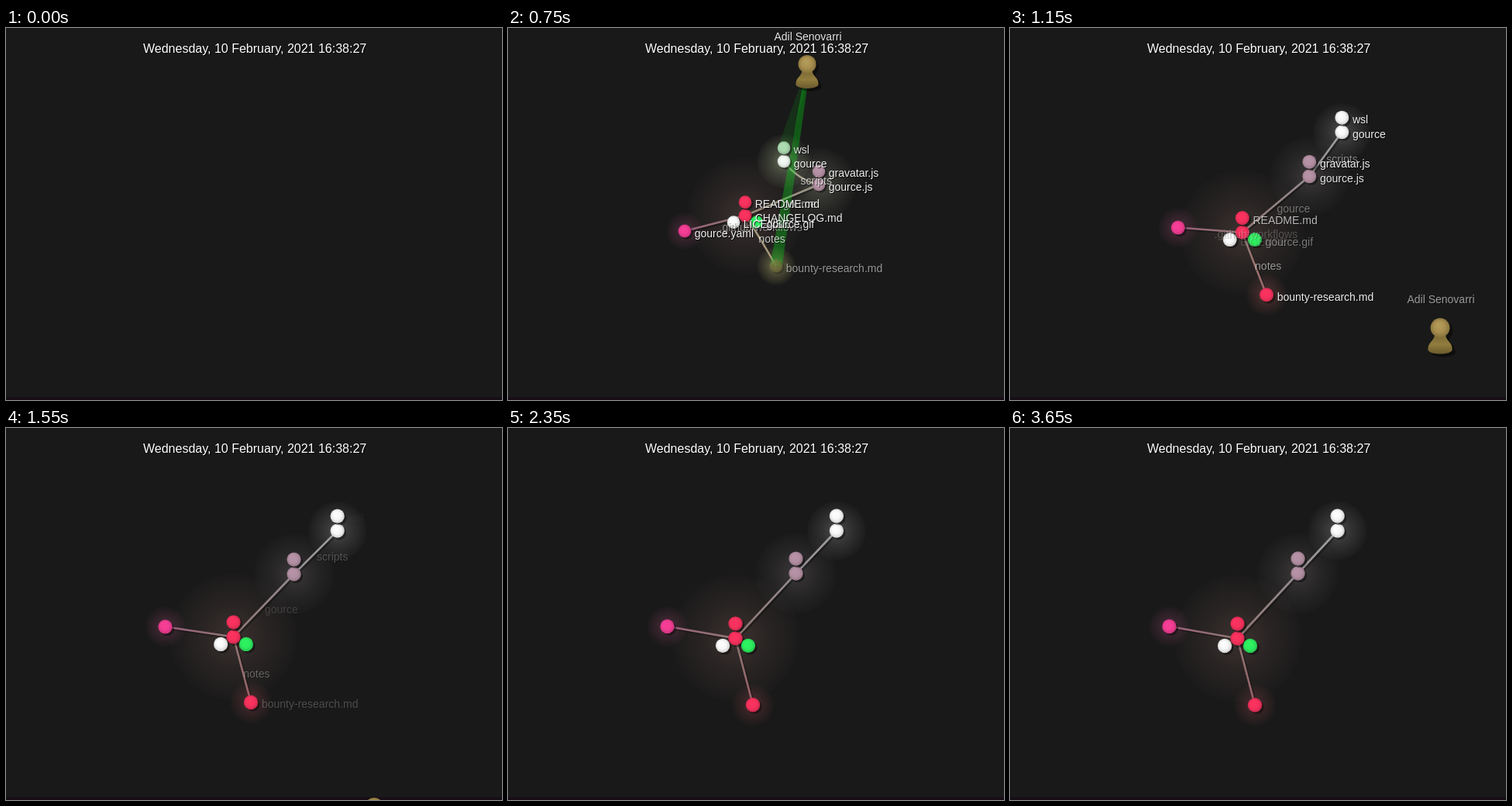
An HTML page with a canvas that plays this animation: 640x480 px, repeating every 3.7 s.

```html
<!DOCTYPE html>
<html lang="en">
<head>
<meta charset="utf-8">
<title>Repository history</title>
<style>
  html, body { margin: 0; width: 100%; height: 100%; overflow: hidden; background: #191919; }
  canvas { display: block; width: 640px; height: 480px; }
</style>
</head>
<body>
<canvas id="stage" width="640" height="480"></canvas>
<script>
const ctx = document.getElementById('stage').getContext('2d');
const LOOP = 3700, STEP = 50, TURN = 750, USER_GONE = 1700;
const FONT = '"Liberation Sans", Arial, sans-serif';
const BLACK = [0, 0, 0], WHITE = [252, 252, 252], GREY = [108, 108, 108];
const RED = [252, 50, 95], PINK = [246, 62, 150], LIME = [45, 242, 96], MAUVE = [182, 146, 166];
const NEW_FILE = [25, 210, 45], NEW_GLOW = [140, 165, 95], NEW_EDGE = [170, 165, 125];

const clamp = (v, a = 0, b = 1) => Math.min(b, Math.max(a, v));
const smooth = v => (v = clamp(v), v * v * (3 - 2 * v));
const lerp = (a, b, k) => a + (b - a) * k;
const mix = (a, b, k) => a.map((v, i) => lerp(v, b[i], k));
const rgba = (c, a = 1) => `rgba(${c.map(Math.round).join()},${a})`;
const point = ([x, y]) => ({ x, y });

// A folder grows from its birth place to a turning point, then settles at rest.
const dirs = {
  root: { born: 90, from: [340, 235], turn: [306, 242], rest: [293.5, 271.5],
          radius: 82, glow: [170, 128, 120], power: 0.24 },
  flows: { born: 90, parent: 'root', label: '.github/workflows', shift: 4,
           from: [312, 262], turn: [228, 262], rest: [205.5, 256],
           radius: 26, glow: [190, 85, 135], power: 0.34 },
  gource: { born: 370, parent: 'root', label: 'gource',
            from: [379, 228], turn: [401, 202], rest: [371.5, 187.5],
            radius: 52, glow: [180, 166, 174], power: 0.22 },
  scripts: { born: 500, parent: 'gource', label: 'scripts', bend: [-5, 9], sway: 7,
             from: [377, 208], turn: [356, 172], rest: [422.5, 132.5],
             radius: 38, glow: [205, 205, 205], power: 0.28 },
  notes: { born: 620, parent: 'root', label: 'notes', bend: [-8, -16],
           from: [322, 262], turn: [346, 307], rest: [316, 357.5],
           radius: 27, glow: [190, 85, 95], power: 0.34 }
};

// Files appear one after another in this order.
const files = [
  ['flows', 'gource.yaml', PINK],
  ['root', 'CHANGELOG.md', RED],
  ['root', 'LICENSE', WHITE],
  ['root', 'gource.gif', LIME],
  ['root', 'README.md', RED],
  ['gource', 'gource.js', MAUVE],
  ['gource', 'gravatar.js', MAUVE],
  ['scripts', 'gource', WHITE],
  ['scripts', 'wsl', WHITE],
  ['notes', 'bounty-research.md', RED]
].map(([dir, name, color], i) => ({ dir: dirs[dir], name, color, born: 90 + 60 * i }));

for (const d of Object.values(dirs)) {
  d.parent = dirs[d.parent];
  // The first file sits in the centre, the others spread evenly on a ring.
  const own = files.filter(f => f.dir === d);
  own.forEach((f, i) => {
    const angle = Math.PI / 2 * 3 - 2 * Math.PI * i / Math.max(1, own.length - 1);
    f.offset = i ? [Math.cos(angle) * 19, Math.sin(angle) * 19] : [0, 0];
  });
}

const userPath = [[100, 350, 222], [400, 391.5, 171], [750, 386, 57], [1050, 573, 300],
                  [1150, 555, 398], [1550, 475, 501], [1700, 450, 525]];

// Cubic curve through timed key points.
function along(keys, t) {
  const n = keys.length - 1;
  t = clamp(t, keys[0][0], keys[n][0]);
  let i = 0;
  while (i < n - 1 && t > keys[i + 1][0]) i++;
  const a = keys[i], b = keys[i + 1], span = b[0] - a[0], s = (t - a[0]) / span;
  const slope = (j, k) => {
    const p = keys[Math.max(0, j - 1)], q = keys[Math.min(n, j + 1)];
    return (q[k] - p[k]) / (q[0] - p[0]) * span;
  };
  const axis = k => lerp(a[k], b[k], smooth(s))
    + s * (1 - s) * ((1 - s) * slope(i, k) - s * slope(i + 1, k));
  return point([axis(1), axis(2)]);
}

function dirPos(d, t) {
  if (t <= TURN) return point(mix(d.from, d.turn, smooth((t - d.born) / (TURN - d.born))));
  const age = t - TURN, swing = age / 400 * Math.exp(1 - age / 400);
  return {
    x: lerp(d.turn[0], d.rest[0], d.sway ? 1 - Math.exp(-age / 100) : smooth(age / 800))
      + (d.sway || 0) * swing,
    y: lerp(d.turn[1], d.rest[1], 1 - Math.exp(-age / (d.sway ? 130 : 300)))
  };
}

const zoomAt = t => Math.max(0.45, 1 - 0.32 * Math.exp((400 - t) / 275));
const freshness = (d, t) => clamp(1 - (t - d.born) / 600);
const dirAlpha = age => 0.85 * clamp(age / 40) * clamp(1 - age / 1450);
const fileAlpha = age => 0.93 * clamp(age / 200, 0.25) * smooth((1020 - age) / 300);
const userAlpha = t => 0.9 * clamp((1500 - t) / 550);

function text(str, x, y, alpha, size = 14, align = 'left') {
  if (alpha <= 0.01) return;
  ctx.font = `${size}px ${FONT}`;
  ctx.textAlign = align;
  ctx.fillStyle = rgba(BLACK, alpha * 0.8);
  ctx.fillText(str, x + 1, y + 1);
  ctx.fillStyle = `rgba(255,255,255,${alpha})`;
  ctx.fillText(str, x, y);
}

function disc(x, y, r, fill) {
  ctx.fillStyle = fill;
  ctx.beginPath();
  ctx.arc(x, y, r, 0, Math.PI * 2);
  ctx.fill();
}

function shade(gradient, ...colors) {
  colors.forEach((c, i) => gradient.addColorStop(i / (colors.length - 1), c));
  return gradient;
}

function drawGlow(d, t, zoom) {
  const { x, y } = d.pos, r = d.radius * zoom, fresh = freshness(d, t);
  const color = mix(d.glow, NEW_GLOW, fresh);
  const power = d.power * (1 + 1.5 * fresh) * clamp((t - d.born) / 100);
  disc(x, y, r, shade(ctx.createRadialGradient(x, y, 0, x, y, r),
    rgba(color, power), rgba(color, power * 0.47), rgba(color, power * 0.06)));
}

function placeEdge(d, t) {
  const p = d.parent.pos, q = d.pos, [bx, by] = d.bend || [0, 0];
  const k = clamp((1250 - t) / 500);
  d.ctrl = { x: (p.x + q.x) / 2 + bx * k, y: (p.y + q.y) / 2 + by * k };
  d.mid = { x: (p.x + q.x) / 4 + d.ctrl.x / 2, y: (p.y + q.y) / 4 + d.ctrl.y / 2 };
}

function drawEdge(d, t, zoom) {
  const p = d.parent.pos, q = d.pos, fresh = freshness(d, t);
  const tone = n => rgba(mix(mix(n.glow, GREY, 0.45), NEW_EDGE, fresh));
  const stroke = (off, style) => {
    ctx.strokeStyle = style;
    ctx.beginPath();
    ctx.moveTo(p.x + off, p.y + off);
    ctx.quadraticCurveTo(d.ctrl.x + off, d.ctrl.y + off, q.x + off, q.y + off);
    ctx.stroke();
  };
  ctx.globalAlpha = clamp((t - d.born) / 80);
  ctx.lineWidth = 1.2 + 1.4 * zoom;
  stroke(2, rgba(BLACK, 0.3));
  stroke(0, shade(ctx.createLinearGradient(p.x, p.y, q.x, q.y), tone(d.parent), tone(d)));
  ctx.globalAlpha = 1;
}

function drawBeam(f, t, from, zoom) {
  const power = Math.pow(clamp(1 - (t - f.born) / 240), 1.5);
  if (!power) return;
  const dx = f.pos.x - from.x, dy = f.pos.y - from.y, len = Math.hypot(dx, dy) || 1;
  const nx = -dy / len * zoom, ny = dx / len * zoom;
  ctx.fillStyle = `rgba(8,205,25,${power})`;
  ctx.beginPath();
  ctx.moveTo(from.x + nx * 3, from.y + ny * 3);
  ctx.lineTo(f.pos.x + nx * 8.5, f.pos.y + ny * 8.5);
  ctx.lineTo(f.pos.x - nx * 8.5, f.pos.y - ny * 8.5);
  ctx.lineTo(from.x - nx * 3, from.y - ny * 3);
  ctx.fill();
}

function drawBall(f, t, zoom) {
  const { x, y } = f.pos, r = 9.2 * zoom, age = t - f.born;
  const color = mix(f.color, NEW_FILE, clamp(1 - age / 250));
  const dark = k => rgba(mix(color, BLACK, k));
  ctx.globalAlpha = clamp(age / 200);
  disc(x + 2.5 * zoom, y + 2.5 * zoom, r, rgba(BLACK, 0.4));
  disc(x, y, r, shade(ctx.createRadialGradient(x - r * 0.2, y - r * 0.25, r * 0.3, x, y, r),
    dark(0), dark(0.03), dark(0.18)));
  ctx.globalAlpha = 1;
}

function pawn(body, head) {
  ctx.fillStyle = body;
  ctx.beginPath();
  ctx.moveTo(-7, -3);
  ctx.bezierCurveTo(-8, 7, -16, 7, -16, 17);
  ctx.bezierCurveTo(-16, 25, 16, 25, 16, 17);
  ctx.bezierCurveTo(16, 7, 8, 7, 7, -3);
  ctx.fill();
  disc(0, -11.5, 12.7, head);
}

function drawUser(pos, zoom) {
  ctx.save();
  ctx.translate(pos.x + 4 * zoom, pos.y + 4 * zoom);
  ctx.scale(zoom, zoom);
  pawn(rgba(BLACK, 0.45), rgba(BLACK, 0.4));
  ctx.translate(-4, -4);
  pawn(shade(ctx.createLinearGradient(0, -2, 0, 23), '#7c6936', '#917c3e', '#6a592c'),
    shade(ctx.createRadialGradient(-2, -15, 2, 0, -11.5, 13), '#b39b59', '#a88f50', '#86723b'));
  ctx.restore();
}

function drawScene(t) {
  const zoom = zoomAt(t), me = along(userPath, t);
  const live = Object.values(dirs).filter(d => t >= d.born);
  const branches = live.filter(d => d.parent);
  const shown = files.filter(f => t >= f.born);
  for (const d of live) d.pos = dirPos(d, t);
  for (const d of branches) placeEdge(d, t);
  for (const f of shown) {
    const { x, y } = f.dir.pos, [ox, oy] = f.offset;
    f.pos = { x: x + ox * zoom, y: y + oy * zoom };
  }
  for (const d of live) drawGlow(d, t, zoom);
  for (const d of branches) drawEdge(d, t, zoom);
  for (const f of shown) drawBeam(f, t, me, zoom);
  for (const f of shown) drawBall(f, t, zoom);
  if (t < USER_GONE) drawUser(me, zoom);
  for (const d of branches)
    text(d.label, d.mid.x + 1.5 + (d.shift || 0), d.mid.y + 10, dirAlpha(t - d.born));
  for (const f of shown)
    text(f.name, f.pos.x + 14 * zoom, f.pos.y + 7.5, fileAlpha(t - f.born));
  text('Adil Senovarri', me.x + 1, me.y - 10 - 34 * zoom, userAlpha(t), 14, 'center');
}

function draw(t) {
  ctx.fillStyle = '#191919';
  ctx.fillRect(0, 0, 640, 480);
  ctx.fillStyle = '#170d16';
  ctx.fillRect(0, 476.5, 640, 3.5);
  if (t >= 100) drawScene(t);
  text('Wednesday, 10 February, 2021 16:38:27', 177, 32, 1, 16);
}

const start = performance.now();
function tick() {
  const t = (performance.now() - start) % LOOP;
  draw(Math.floor(t / STEP) * STEP);
  requestAnimationFrame(tick);
}
draw(0);
requestAnimationFrame(tick);
</script>
</body>
</html>
```
